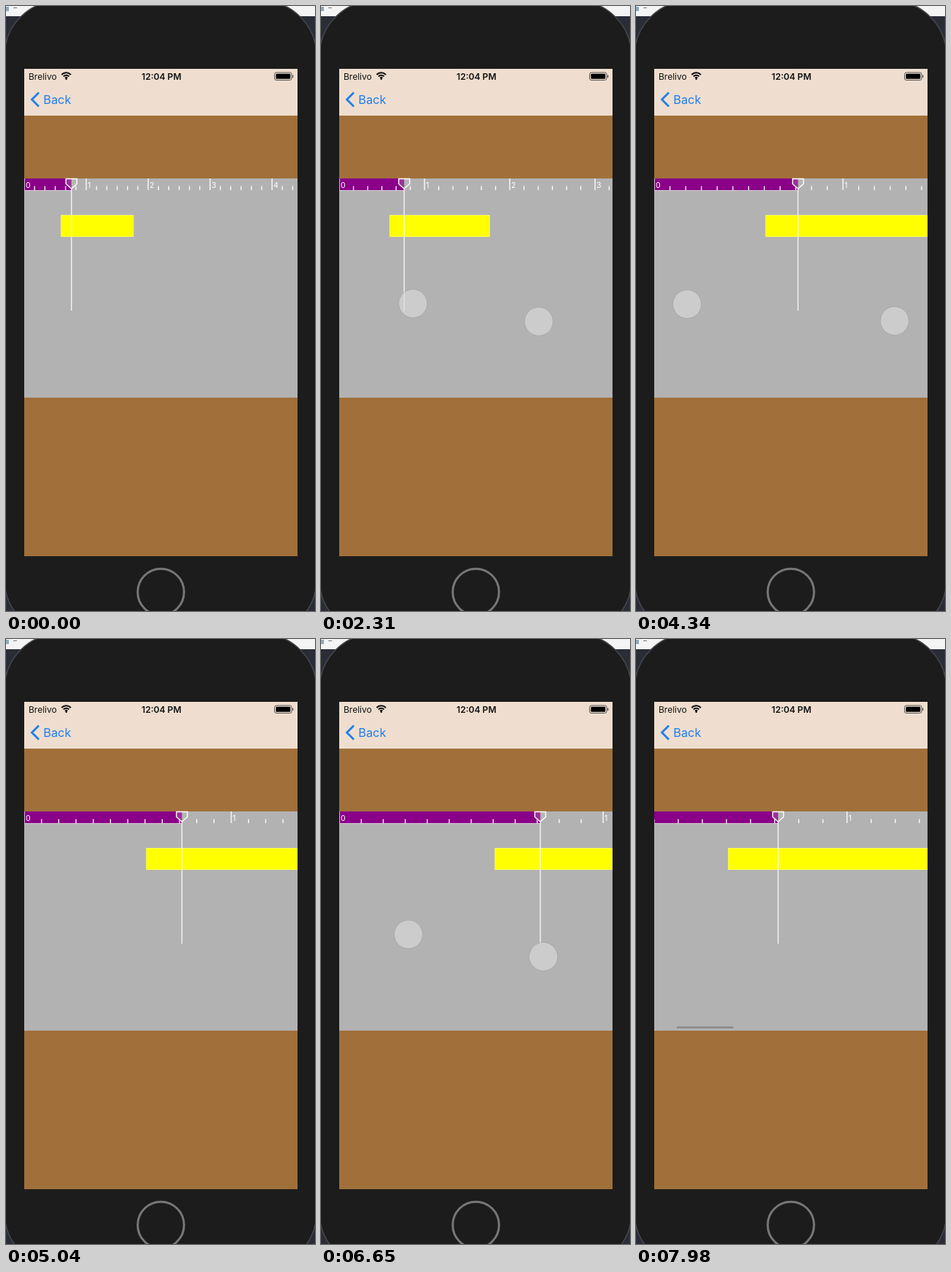
Write an HTML page with a canvas that moves like this. It is 424 px wide and 828 px high and loops after 8 s.

```html
<!DOCTYPE html>
<html lang="en">
<head>
<meta charset="utf-8">
<title>Zoomable ruler</title>
<style>
  html, body { margin: 0; width: 100%; height: 100%; overflow: hidden; background: #1c1c1c; }
  canvas { display: block; }
</style>
</head>
<body>
<canvas id="stage" width="424" height="828"></canvas>
<script>
const ctx = document.getElementById('stage').getContext('2d');
const LOOP = 8000, STEP = 70;
const LEFT = 25, RIGHT = 400, WIDTH = RIGHT - LEFT, TOP = 236;
const FONT = 'Inter, Roboto, sans-serif';

// Each pinch widens two mirrored fingers and zooms to a new unit width
const FIRST_ZOOM = 85;
const pinches = [
  { start: 1863, time: 1413, from: 65, to: 155, tilt: 12.3, zoom: 220 },
  { start: 3780, time: 977, from: 121, to: 156, tilt: 11.4, zoom: 284 },
  { start: 5900, time: 1190, from: 73, to: 101.4, tilt: 15.2, zoom: 397 }
];
const drag = { start: 7250, time: 590, distance: 132.5 };

const mix = (a, b, p) => a + (b - a) * p;
const progress = (g, t) => Math.min(1, Math.max(0, (t - g.start) / g.time));
const smooth = u => u * u * (3 - 2 * u);
const easeOut = u => 1 - (1 - u) ** 2;

const zoomAt = t => pinches.reduce((z, g) => mix(z, g.zoom, smooth(progress(g, t))), FIRST_ZOOM);
const scrollAt = t => drag.distance * easeOut(progress(drag, t));

function rect(x, y, w, h, color) {
  ctx.fillStyle = color;
  ctx.fillRect(x, y, w, h);
}

function paint(fill, stroke, lineWidth = 1) {
  if (fill) { ctx.fillStyle = fill; ctx.fill(); }
  if (stroke) { ctx.strokeStyle = stroke; ctx.lineWidth = lineWidth; ctx.stroke(); }
}

function roundRect(x, y, w, h, r, ...style) {
  ctx.beginPath();
  ctx.roundRect(x, y, w, h, r);
  paint(...style);
}

function circle(x, y, r, ...style) {
  ctx.beginPath();
  ctx.arc(x, y, r, 0, 2 * Math.PI);
  paint(...style);
}

function text(str, x, y, size, color, weight = 400, align = 'left') {
  ctx.font = `${weight} ${size}px ${FONT}`;
  ctx.textAlign = align;
  ctx.fillStyle = color;
  ctx.fillText(str, x, y);
}

function drawPhone() {
  rect(0, 0, 424, 828, '#2a2c36');
  rect(0, 0, 424, 14, '#f4f4f4');
  rect(0, 1, 4, 6, '#8fa9bd');
  rect(10, 2, 5, 1, '#777');
  roundRect(-2, -7, 428, 867, 75, '#1c1c1c', '#45474d', 1.5);
  circle(212.5, 802, 31.8, null, '#777', 3);
  rect(LEFT, 86, WIDTH, 667, '#a1703a');
  rect(LEFT, 86, WIDTH, 64, '#efdecf');
}

function drawBars() {
  text('Brelivo', 31, 101, 12, '#111');
  text('12:04 PM', 213.3, 101, 12.1, '#111', 600, 'center');

  // Wi-Fi fan
  for (const r of [2, 5.2, 8.7]) {
    ctx.beginPath();
    ctx.arc(82.7, 100, r, -Math.PI * 0.76, -Math.PI * 0.24);
    paint(null, '#111', 2.1);
  }
  circle(82.7, 99.8, 1.3, '#111');

  // Battery
  roundRect(368.5, 91, 23.5, 10.5, 2.5, null, '#555');
  roundRect(370.3, 92.8, 19.9, 6.9, 1, '#000');
  rect(393, 94.5, 1.3, 3.5, '#555');

  ctx.stroke(new Path2D());
  ctx.beginPath();
  ctx.moveTo(45, 118.5);
  ctx.lineTo(35.5, 128);
  ctx.lineTo(45, 137.5);
  paint(null, '#1f7df0', 2.8);
  text('Back', 51.3, 134, 16.3, '#1f7df0');
}

function drawMarker(x) {
  ctx.beginPath();
  ctx.moveTo(x - 7.5, TOP + 0.5);
  ctx.lineTo(x + 7.5, TOP + 0.5);
  ctx.lineTo(x + 7.5, TOP + 7.5);
  ctx.lineTo(x, TOP + 14);
  ctx.lineTo(x - 7.5, TOP + 7.5);
  ctx.closePath();
  paint('rgba(200,200,200,.25)', '#fff', 1.4);
  rect(x - 0.7, TOP + 14, 1.4, 167, 'rgba(255,255,255,.85)');
}

function drawRuler(zoom, offset) {
  const xOf = u => LEFT + u * zoom - offset;
  const marker = xOf(0.762);
  const parts = zoom > 240 ? 12 : 6;

  rect(LEFT, TOP, WIDTH, 300, '#b2b2b2');
  rect(LEFT, TOP, marker - LEFT, 16, '#8a0088');
  rect(LEFT, TOP + 16, marker - LEFT, 1, '#d6ccd6');

  for (let i = 0; xOf(i / parts) < RIGHT; i++) {
    const x = xOf(i / parts), major = i % parts === 0;
    rect(x - 0.6, major ? TOP : 246.5, 1.3, major ? 16 : 5.5, '#fff');
    if (major) text(i / parts, x + 2, 248.5, 10.5, '#fff');
  }

  const barX = xOf(0.589), barEnd = Math.min(RIGHT, xOf(1.767));
  rect(barX, 286, barEnd - barX, 30, '#ffff50');
  rect(barX + 1, 287, barEnd - barX - 2, 28, '#ffff00');
  drawMarker(marker);

  if (offset > 0) {
    const ratio = 369 / (4.45 * zoom);
    roundRect(28 + offset * ratio, 530.3, WIDTH * ratio, 2.6, 1.3, '#8c8c8c');
  }
}

function touch(x, y) {
  circle(x, y, 19.5, 'rgba(217,217,217,.68)', 'rgba(150,150,150,.5)');
}

function drawTouches(t) {
  for (const g of pinches) {
    if (t < g.start - 150 || t > g.start + g.time + 60) continue;
    const dx = mix(g.from, g.to, smooth(progress(g, t)));
    for (const side of [-1, 1]) touch(212.5 + side * dx, 419.5 + side * g.tilt);
  }
  if (t > drag.start - 70 && t < drag.start + 350) touch(300 - scrollAt(t), 436);
}

function draw(t) {
  drawPhone();
  drawBars();
  ctx.save();
  ctx.beginPath();
  ctx.rect(LEFT, 86, WIDTH, 667);
  ctx.clip();
  drawRuler(zoomAt(t), scrollAt(t));
  drawTouches(t);
  ctx.restore();
}

const start = performance.now();
function frame() {
  const t = (performance.now() - start) % LOOP;
  draw(Math.floor(t / STEP) * STEP);
  requestAnimationFrame(frame);
}
frame();
</script>
</body>
</html>
```
